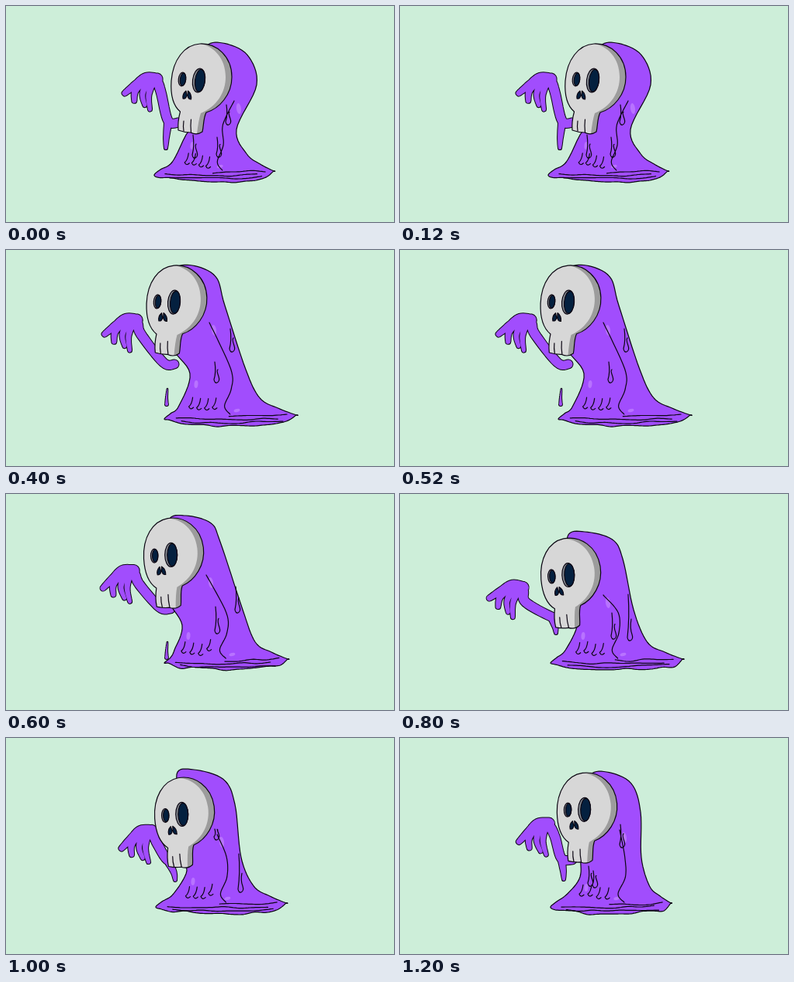
Write an HTML page that moves like this. It is 500x280 px and loops after 1400 ms.

```html
<!DOCTYPE html>
<html lang="en">
<head>
<meta charset="utf-8">
<title>Slime ghost</title>
<style>
  html, body { margin: 0; width: 100%; height: 100%; overflow: hidden; background: #cdeed9; }
  svg { display: block; width: 100%; height: 100%; }
  .ink { stroke: #0b0612; stroke-width: 1.2; stroke-linejoin: round; stroke-linecap: round; }
  .slime { fill: #a14dfd; }
  .wide { stroke-width: 2; }
  .line { fill: none; }
  .shine { fill: #b873ff; }
  .bone { fill: #d7d7d7; }
  .shade { fill: #9c9c9c; }
  .rim { fill: #878d94; }
  .hole { fill: #04203f; }
</style>
</head>
<body>
<svg viewBox="0 0 500 280">
  <rect width="500" height="280" fill="#cdeed9"/>
  <path id="armEdge" class="ink slime wide"/>
  <path id="armFill" class="slime"/>
  <path id="body" class="ink slime"/>
  <g id="shines"></g>
  <path id="folds" class="ink line"/>
  <g id="skull">
    <path class="bone" d="M250 49C272 48 291 66 291 92C291 115 275 133 258 138C254 146 255 155 253 163Q246 168 238 164Q230 164 222 161Q221 150 224.500 137C214 128 212 112 213 97C215 70 230 50 250 49Z"/>
    <path class="shade" d="M250 49C272 48 291 66 291 92C291 115 275 133 258 138C254 146 255 155 253 163L246 166Q248 148 251 139C272 130 283 112 283 92C283 68 268 52 250 49Z"/>
    <path class="ink line" d="M250 49C272 48 291 66 291 92C291 115 275 133 258 138C254 146 255 155 253 163Q246 168 238 164Q230 164 222 161Q221 150 224.500 137C214 128 212 112 213 97C215 70 230 50 250 49Z"/>
    <g class="ink">
      <g transform="translate(227 95) rotate(7)">
        <ellipse class="rim" rx="4.700" ry="9"/>
        <ellipse class="hole" cx="1" rx="3.600" ry="8.300"/>
      </g>
      <g transform="translate(248.500 96.500) rotate(7)">
        <ellipse class="rim" rx="8" ry="15.500"/>
        <ellipse class="hole" cx="1.500" rx="6.400" ry="14.500"/>
      </g>
      <path class="hole" d="M232 110q-5 4-4 10q4 1 5-4zM234.500 110q5 4 4 11q-4 0-4.500-5z"/>
      <path class="line" d="M229 149q-1 7 0 13M238.500 147q-1 8 0 17"/>
    </g>
  </g>
</svg>
<script>
const STEP = 200;

// skull and hand: x, y, angle; puddle: left and right x; drips: x, y, length
const poses = [
  { skull: [252, 95, 0], hand: [181, 85, 4], elbow: [209, 149], hang: [206, 184],
    top: [279, 48], side: [323, 102], back: [297, 160], waist: [232, 167], puddle: [191, 345],
    drips: [[243, 167, 30], [274, 170, 26], [286, 128, 26]] },
  { skull: [234, 70, -7], hand: [181, 72, 4], elbow: [206, 141], hang: [208, 185],
    top: [258, 30], side: [299, 78], back: [305, 140], waist: [237, 155], puddle: [193, 357],
    drips: [[288, 96, 26], [268, 134, 32], [289, 140, 25]] },
  { skull: [220, 66, -2], hand: [155, 81, 4], elbow: [203, 146], drop: [207, 200],
    top: [240, 20], side: [282, 72], back: [309, 155], waist: [237, 160], puddle: [204, 374],
    drips: [[291, 102, 30], [271, 145, 27]] },
  { skull: [216, 77, -7], hand: [150, 91, -2], elbow: [198, 147], drop: [207, 212],
    top: [232, 28], side: [276, 62], back: [305, 150], waist: [227, 170], puddle: [204, 363],
    drips: [[298, 120, 34], [272, 146, 35]] },
  { skull: [220, 103, -9], hand: [146, 110, 10], elbow: [195, 159], hang: [201, 180],
    top: [238, 49], side: [287, 84], back: [301, 150], waist: [228, 170], puddle: [194, 364],
    drips: [[296, 130, 60], [275, 154, 34]] },
  { skull: [230, 97, -8], hand: [173, 112, -3], elbow: [208, 158], hang: [218, 184],
    top: [242, 41], side: [295, 86], back: [303, 155], waist: [233, 172], puddle: [193, 361],
    drips: [[302, 150, 50], [271, 118, 14]] },
  { skull: [241, 91, -5], hand: [177, 103, -4], elbow: [208, 156], hang: [211, 183],
    top: [266, 44], side: [310, 96], back: [311, 155], waist: [232, 180], puddle: [194, 349],
    drips: [[286, 112, 30], [245, 166, 26], [251, 172, 22]] }
];

// Centre lines from the knuckles, with start and end radius
const fingers = [
  { line: [[14, 9], [0, 8], [-12, 17], [-26, 30]], r: [7.5, 3.5] },
  { line: [[-6, 15], [-13, 27], [-13, 39]], r: [5, 3] },
  { line: [[1, 15], [-3, 30], [1, 44]], r: [4.5, 2.5] },
  { line: [[9, 13], [5, 31], [8, 49]], r: [4.5, 2.5] }
];

const lerp = (a, b, t) => a + (b - a) * t;
const add = ([x, y], dx, dy) => [x + dx, y + dy];
const set = (id, name, value) => document.getElementById(id).setAttribute(name, value);

function seeded(seed) {
  return () => {
    const v = Math.sin(++seed * 127.1) * 43758.5453;
    return v - Math.floor(v);
  };
}

// Points along a smooth curve through the key points
function spline(pts, closed = false) {
  const n = pts.length, out = [];
  const at = i => pts[closed ? (i + n) % n : Math.max(0, Math.min(n - 1, i))];
  for (let i = 0; i < (closed ? n : n - 1); i++) {
    const [a, b, c, d] = [-1, 0, 1, 2].map(k => at(i + k));
    for (let t = 0; t < 1; t += 0.125) {
      out.push(b.map((v, k) => v + t / 2 * (c[k] - a[k]
        + t * (2 * a[k] - 5 * v + 4 * c[k] - d[k] + t * (3 * (v - c[k]) + d[k] - a[k])))));
    }
  }
  if (!closed) out.push(pts[n - 1]);
  return out;
}

const trace = pts => 'M' + pts.map(p => p.map(v => v.toFixed(1))).join('L');

// Tapered tube with round ends
function limb(line, [r0, r1]) {
  const mid = spline(line), last = mid.length - 1;
  const edge = side => mid.map(([x, y], i) => {
    const a = mid[Math.max(0, i - 1)], b = mid[Math.min(last, i + 1)];
    const angle = Math.atan2(b[1] - a[1], b[0] - a[0]);
    const r = side * lerp(r0, r1, i / last);
    return [x + r * Math.sin(angle), y - r * Math.cos(angle)];
  });
  const far = edge(-1).reverse();
  return `${trace(edge(1))}A${r1} ${r1} 0 0 1 ${far[0]}${trace(far).replace('M', 'L')}A${r0} ${r0} 0 0 1 ${edge(1)[0]}Z`;
}

function armPath({ hand: [x, y, angle], elbow, hang, drop }) {
  const turn = angle * Math.PI / 180, c = Math.cos(turn), s = Math.sin(turn);
  const place = ([u, v]) => [x + u * c - v * s, y + u * s + v * c];
  const forearm = [place([6, 9]), place([15, 13]), place([21, 27]), elbow, add(elbow, 14, 2)];
  let d = fingers.map(f => limb(f.line.map(place), f.r)).join('') + limb(forearm, [6.5, 5.5]);
  if (hang) d += limb([elbow, [lerp(elbow[0], hang[0], 0.8), lerp(elbow[1], hang[1], 0.6)], hang], [5, 2]);
  if (drop) d += limb([add(drop, 1, -20), add(drop, 0, -8), drop], [0.3, 2]);
  return d;
}

function bodyPath(p, rand) {
  const [left, right] = p.puddle, tip = [right, 214], edge = [left, 219];
  const ankle = [lerp(p.back[0], right, 0.28), 192];
  const hood = [lerp(p.top[0], p.side[0], 0.72), lerp(p.top[1], p.side[1], 0.28)];
  const rim = [];
  for (let t = 0.06; t < 0.97; t += 0.09) {
    rim.push([lerp(right, left, t), 218 + 10 * Math.sqrt(Math.sin(Math.PI * t)) + 4 * (rand() - 0.5)]);
  }
  return trace(spline([
    add(p.top, -22, 6), p.top, hood, p.side, p.back, ankle,
    [lerp(ankle[0], right, 0.5), 205], tip, tip, ...rim, edge, add(edge, 8, -7),
    [lerp(p.waist[0], left, 0.43), 202], p.waist, add(p.skull, -8, 55), p.skull.slice(0, 2)
  ], true)) + 'Z';
}

function foldPath(p, rand) {
  const [left, right] = p.puddle, [wx] = p.waist, [bx] = p.back;
  const seam = [add(p.skull, 42, 28), [lerp(wx, bx, 0.73), 154], [lerp(wx, bx, 0.74), 180],
    [lerp(wx, bx, 0.62), 202], [lerp(wx, bx, 0.72), 213]];
  let d = trace(spline(seam));
  for (const [x, y, len] of p.drips) {
    d += `M${x - 2} ${y}q2 ${len / 2}-1 ${len - 4}q1 5 4 4q4-2 2-8q-3-8-1-${len / 3}`;
  }
  // short runs of slime above the puddle
  for (let t = 0.05; t < 0.6; t += 0.14) {
    d += `M${lerp(wx, bx, t)} ${188 + 8 * rand()}q-1 9-5 12q2 5 6 1`;
  }
  // ripples across the puddle
  for (let row = 0; row < 3; row++) {
    const wave = [];
    for (let t = 0.05 + 0.04 * row; t < 0.93; t += 0.11) {
      wave.push([lerp(left, right, t), 213 + row * 4 + 3 * Math.sin(Math.PI * t) + 3 * (rand() - 0.5)]);
    }
    d += trace(spline(row ? wave : wave.slice(4)));
  }
  return d;
}

function shineMarks({ skull, hand, waist, puddle }) {
  const spot = (x, y, rx, ry, angle) =>
    `<ellipse class="shine" rx="${rx}" ry="${ry}" transform="translate(${x} ${y}) rotate(${angle})"/>`;
  return spot(skull[0] + 48, skull[1] + 38, 3, 7, -8)
    + spot(waist[0] + 8, waist[1] + 14, 2.5, 5, 5)
    + spot(lerp(...puddle, 0.55), 208, 4, 2, -15);
}

const shapes = poses.map((p, i) => {
  const rand = seeded(i * 50);
  const [x, y, angle] = p.skull;
  return {
    arm: armPath(p),
    body: bodyPath({ ...p, skull: [x, y] }, rand),
    folds: foldPath({ ...p, skull: [x, y] }, rand),
    shines: shineMarks(p),
    skull: `translate(${x} ${y}) rotate(${angle}) translate(-252 -95)`
  };
});

let shown = -1;
function draw(now) {
  const i = Math.floor(now / STEP) % shapes.length;
  if (i === shown) return;
  shown = i;
  const s = shapes[i];
  set('armEdge', 'd', s.arm);
  set('armFill', 'd', s.arm);
  set('body', 'd', s.body);
  set('folds', 'd', s.folds);
  set('skull', 'transform', s.skull);
  document.getElementById('shines').innerHTML = s.shines;
}

function tick() {
  draw(performance.now());
  requestAnimationFrame(tick);
}
tick();
</script>
</body>
</html>
```
